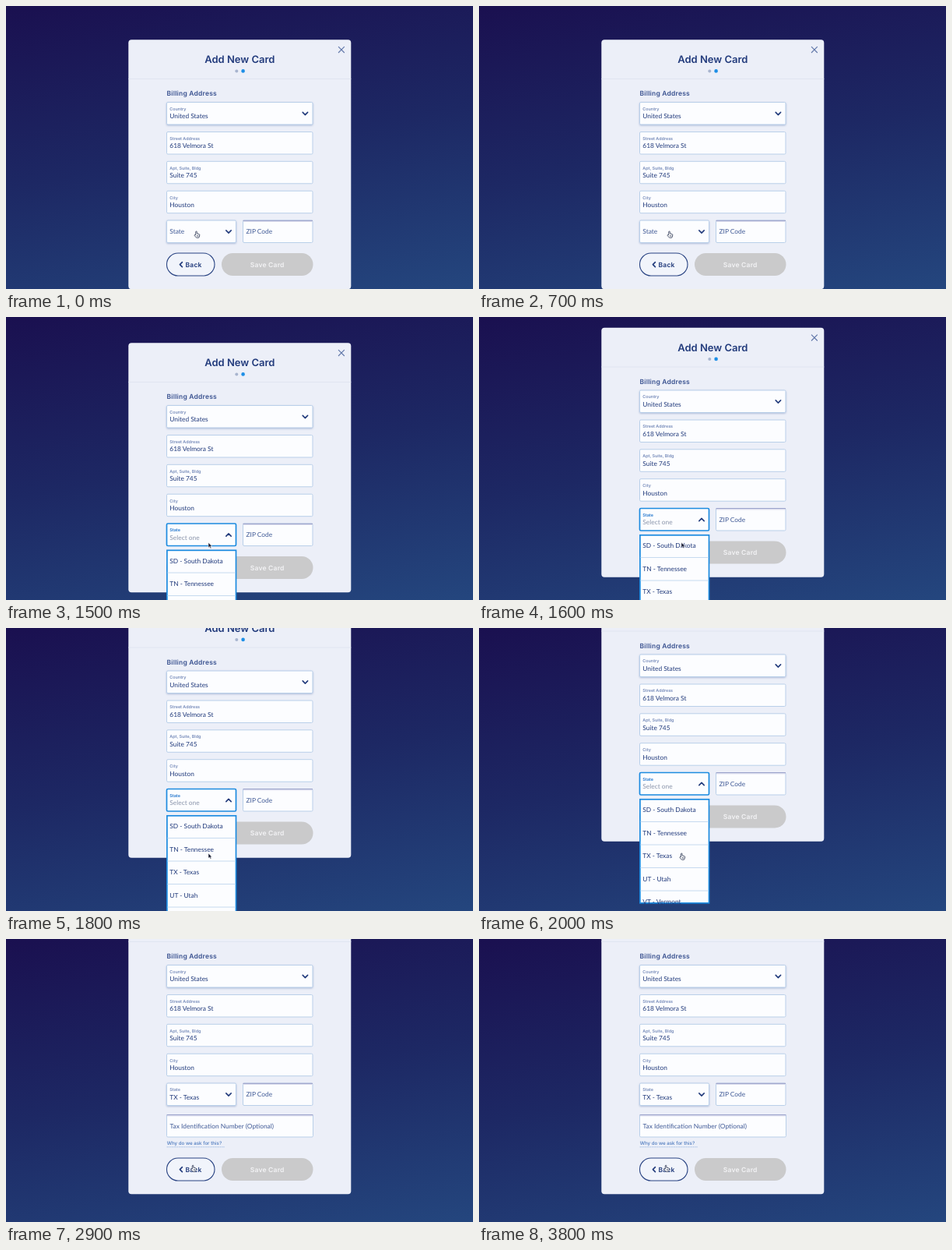
An HTML page that plays this animation: 600x363 px, repeating every 4100 ms.

```html
<!DOCTYPE html>
<html lang="en">
<head>
<meta charset="utf-8">
<title>Add New Card</title>
<style>
  html, body { margin: 0; width: 100%; height: 100%; overflow: hidden; }
  body { background: linear-gradient(170deg, #1a1050, #1d2864 50%, #24467e); }
  svg { display: block; width: 600px; height: 363px; }
  text { font: 8.4px Lato, sans-serif; fill: #223b7c; text-rendering: geometricPrecision; }
  .title { font: 600 13px Inter, sans-serif; text-anchor: middle; }
  .heading, .button { font: 600 8.5px Inter, sans-serif; letter-spacing: .2px; fill: #3a5290; }
  .button { fill: #223b7c; }
  .label { font: 600 5.4px Inter, sans-serif; fill: #7489b8; }
  .hint { fill: #8b95ab; }
  .soft { fill: #405a96; }
  .link { font: 500 6.2px Inter, sans-serif; fill: #4a78bd; }
  .box { fill: #fcfdff; stroke: #b9cfe9; }
  .raised { filter: drop-shadow(0 1.5px 1px #8a9dc8a0); }
  .open { stroke: #1c8be0; stroke-width: 1.7; }
  .line { fill: none; stroke: #223b7c; stroke-width: 1.6; stroke-linecap: round; stroke-linejoin: round; }
</style>
</head>
<body>
<svg viewBox="0 0 600 363">
  <defs><clipPath id="listClip"><rect id="listClipBox" x="205" y="308" width="93"/></clipPath></defs>
  <g id="page"></g>
  <path id="arrow" d="M0 0V6.3L1.5 5 2.7 7.3 3.8 6.8 2.7 4.6H4.6Z" fill="#10152b" stroke="#fff" stroke-width=".5"/>
  <path id="hand" d="M2.1 5V1a.8.8 0 0 1 1.6 0V3.2L6.4 3.8Q7.4 4.1 7.2 5L6.7 7.2 6.1 8.4H3L.6 5.7Q.3 4.7 1.2 4.5ZM4 5.4V6.8M5.3 5.4V6.8"
        fill="#fff" stroke="#25304f" stroke-width=".8"/>
</svg>
<script>
const LOOP = 4100, STEP = 100;
const $ = id => document.getElementById(id);

const text = (x, y, str, cls = '', more = '') => `<text x="${x}" y="${y}" class="${cls}" ${more}>${str}</text>`;
const box = (x, y, w, cls = '', more = '') =>
  `<rect x="${x}" y="${y}" width="${w}" height="28.5" rx="1.5" class="box ${cls}" ${more}/>`;
const filled = (y, label, value, cls) =>
  box(206.5, y, 187.5, cls) + text(210.3, y + 10.3, label, 'label') + text(210.3, y + 20.8, value);
const inset = (x, y, w, hint) => box(x, y, w) +
  `<path d="M${x} ${y + .3}h${w}" stroke="#8e91bf"/><path d="M${x + .5} ${y + 1.4}h${w - 1}" stroke="#d9dcee"/>` +
  text(x + 4, y + 17, hint, 'soft');
const chevron = (x, y, id = '') => `<path id="${id}" class="line" d="M${x - 3.2} ${y - 1.6}l3.2 3.2 3.2-3.2"/>`;

const states = ['SD - South Dakota', 'TN - Tennessee', 'TX - Texas', 'UT - Utah', 'VT - Vermont'];
const rows = states.map((name, i) => {
  const y = 308.5 + i * 29.5;
  return (i ? `<path d="M207.5 ${y}h87" stroke="#c6daef"/>` : '') + text(210.3, y + 17.2, name);
}).join('');

$('page').innerHTML = `
  <rect id="card" x="157.3" y="43.2" width="286" rx="4" fill="#eceff8"/>
  <path d="M157.3 93.5h286" stroke="#e0e5f1"/>
  <path d="M427 52.2l7.8 7.8m0-7.8l-7.8 7.8" stroke="#5f76a8" stroke-width="1.1"/>
  ${text(300.3, 73, 'Add New Card', 'title')}
  <circle cx="296.3" cy="83.4" r="2" fill="#a8b5cf"/>
  <circle cx="304.6" cy="83.4" r="2.3" fill="#1e8fe6"/>
  ${text(206.5, 115, 'Billing Address', 'heading')}
  ${filled(123.5, 'Country', 'United States', 'raised')}${chevron(384.4, 138)}
  ${filled(161.5, 'Street Address', '618 Velmora St')}
  ${filled(199.3, 'Apt, Suite, Bldg', 'Suite 745')}
  ${filled(237.2, 'City', 'Houston')}
  ${box(206.5, 275, 89, 'raised', 'id="state"')}
  ${text(210.3, 292, 'State', 'soft', 'id="stateHint"')}
  ${text(210.3, 285.3, 'State', 'label', 'id="stateLabel"')}
  ${text(210.3, 295.8, 'Select one', 'hint', 'id="stateValue"')}
  ${chevron(286, 289.5, 'stateChevron')}
  ${inset(304.5, 275, 89.5, 'ZIP Code')}
  <g id="tax">
    ${inset(206.5, 315.5, 188, 'Tax Identification Number (Optional)')}
    ${text(206.7, 354.3, 'Why do we ask for this?', 'link')}
    <path d="M206.7 356.8h74" stroke="#6f9bd3" stroke-width=".7" stroke-dasharray="1.2 1"/>
  </g>
  <g id="actions">
    <rect x="206.5" y="317" width="61.5" height="29" rx="14.5" fill="#f1f4fb" stroke="#2a4483" stroke-width="1.1"/>
    <path class="line" d="M226.4 328.6l-3 3 3 3"/>
    ${text(230.5, 334.7, 'Back', 'button')}
    <rect x="277" y="317" width="117.5" height="29" rx="14.5" fill="#cacacb"/>
    ${text(335.7, 334.7, 'Save Card', 'button', 'text-anchor="middle" style="fill:#f3f3f5"')}
  </g>
  <g id="list" clip-path="url(#listClip)">
    <rect x="206.9" y="309.3" width="88.6" height="133" class="box open"/>${rows}
  </g>`;

// Piecewise linear value at time t through [time, value] points
function track(t, points) {
  const i = points.findIndex(p => p[0] > t);
  if (i < 0) return points[points.length - 1][1];
  if (!i) return points[0][1];
  const [t0, a] = points[i - 1], [t1, b] = points[i];
  return a + (b - a) * (t - t0) / (t1 - t0);
}

const show = (id, on) => $(id).style.opacity = +on;

function draw(t) {
  const done = t >= 2900;
  const open = t >= 900 && !done;
  const unfold = track(t, [[800, 0], [1100, 1]]);
  const scroll = track(t, [[1400, 0], [1500, 10], [1600, 29.5], [1800, 68.5], [1900, 82], [2000, 89.5], [2100, 90]]);
  const grow = done ? 54 : 0;

  $('page').setAttribute('transform', `translate(0 ${-scroll})`);
  $('card').setAttribute('height', 320 + grow);
  $('actions').setAttribute('transform', `translate(0 ${grow})`);
  show('tax', done);

  $('state').setAttribute('class', open ? 'box open' : 'box raised');
  show('stateHint', !done && 1 - unfold);
  show('stateLabel', unfold);
  show('stateValue', unfold);
  $('stateLabel').style.fill = open ? '#1f74cc' : '';
  $('stateValue').textContent = done ? 'TX - Texas' : 'Select one';
  $('stateValue').setAttribute('class', done ? '' : 'hint');
  $('stateChevron').setAttribute('transform', open ? 'rotate(180 286 289.5)' : '');
  show('list', open);
  $('listClipBox').setAttribute('height', 136 * unfold);

  const pointing = t < 1000 || t >= 2000;
  const x = track(t, [[900, 241.6], [1400, 260], [1900, 260], [2000, 257.4], [2100, 257.4], [2700, 237.2]]);
  const y = track(t, [[900, 288.8], [1400, 289.5], [2000, 288.8], [2700, 290]]);
  for (const id of ['hand', 'arrow']) {
    $(id).setAttribute('transform', `translate(${x} ${y})`);
    show(id, (id === 'hand') === pointing);
  }
}

const start = performance.now();
function tick() {
  const t = (performance.now() - start) % LOOP;
  draw(Math.floor(t / STEP) * STEP);
  requestAnimationFrame(tick);
}
tick();
</script>
</body>
</html>
```
